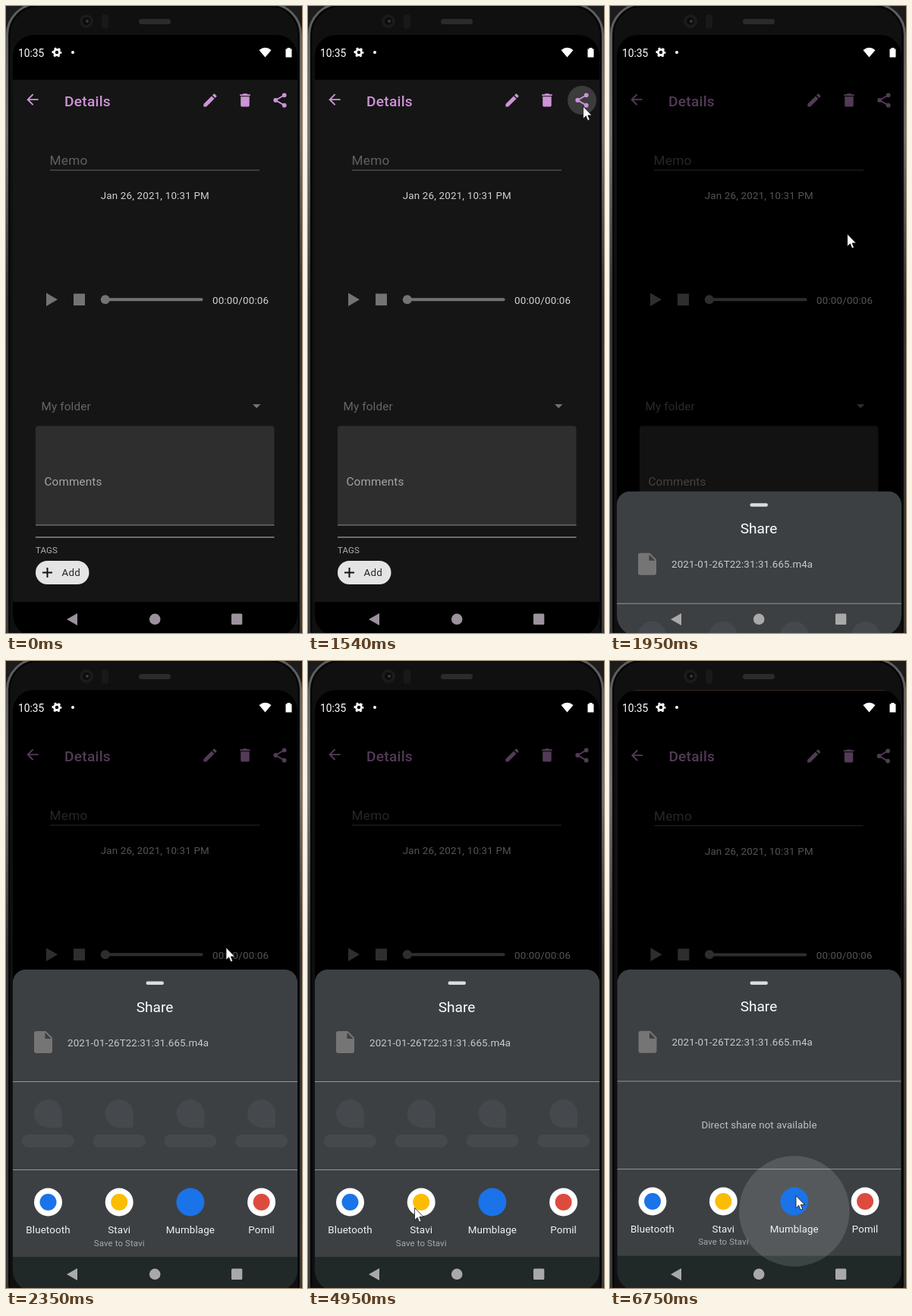
An HTML page for the animation above (6.83 s loop, 390 by 825 pixels).

```html
<!DOCTYPE html>
<html lang="en">
<head>
<meta charset="utf-8">
<title>Sharing a memo</title>
<style>
html, body { margin: 0; width: 100%; height: 100%; overflow: hidden; background: #000; }
svg { display: block; width: 390px; height: 825px; }
text { font-family: Roboto, Arial, sans-serif; font-size: 13.37px; letter-spacing: .12px; }
.body { letter-spacing: .2px; }
.mid { text-anchor: middle; }
.title { font-size: 19.1px; font-weight: 500; letter-spacing: .28px; }
.heading { font-size: 19.1px; letter-spacing: 0; }
.input { font-size: 15.28px; letter-spacing: .14px; }
.small { font-size: 11.46px; letter-spacing: .1px; }
</style>
</head>
<body>
<svg viewBox="0 0 390 825">
  <defs>
    <clipPath id="glass"><rect x="9" y="38" width="375" height="791" rx="27"/></clipPath>
    <linearGradient id="edge" x1="0" y1="0" x2="0" y2="1">
      <stop offset="0" stop-color="#5c5c5c"/>
      <stop offset=".2" stop-color="#707070"/>
      <stop offset=".45" stop-color="#343434"/>
      <stop offset="1" stop-color="#3c3c3c"/>
    </linearGradient>
  </defs>

  <!-- phone body -->
  <rect width="390" height="825" fill="#1c1c1c"/>
  <rect x="1.5" y="-3" width="387" height="860" rx="41" fill="#101010" stroke="url(#edge)" stroke-width="3"/>
  <rect x="4.5" y="0" width="381" height="860" rx="38" fill="none" stroke="#050505" stroke-width="2"/>
  <circle cx="106" cy="20" r="9" fill="#1b1b1b"/>
  <circle cx="106" cy="20" r="5" fill="#0c0c0c"/>
  <circle cx="107" cy="20" r="2" fill="#3a3a3a"/>
  <rect x="126" y="11" width="9" height="19" rx="4" fill="#191919"/>
  <rect x="175" y="17" width="42" height="7" rx="3.5" fill="#2b2b2b"/>

  <g clip-path="url(#glass)">
    <rect x="9" y="38" width="375" height="791" fill="#35201d"/>
    <g id="app">
      <rect x="9" y="38" width="375" height="795" fill="#000"/>
      <rect id="page" x="9" y="97" width="375" height="687" fill="#151515"/>
      <circle id="tap" fill="#fff" fill-opacity=".17"/>

      <!-- toolbar -->
      <g fill="#ce93d8">
        <path transform="translate(23.5 111.7) scale(.955)" d="M20 11H7.83l5.59-5.59L12 4l-8 8 8 8 1.41-1.41L7.83 13H20z"/>
        <path transform="translate(257.5 112.5) scale(.955)" d="M3 17.25V21h3.75L17.81 9.94l-3.75-3.75zM20.71 7.04a1 1 0 0 0 0-1.41l-2.34-2.34a1 1 0 0 0-1.41 0l-1.83 1.83 3.75 3.75z"/>
        <path transform="translate(303.5 112.5) scale(.955)" d="M6 19a2 2 0 0 0 2 2h8a2 2 0 0 0 2-2V7H6zM19 4h-3.5l-1-1h-5l-1 1H5v2h14z"/>
        <g transform="translate(349.5 112.5) scale(.955)">
          <path d="M18 5L6 12l12 7" fill="none" stroke="#ce93d8" stroke-width="2"/>
          <circle cx="18" cy="5" r="3"/><circle cx="6" cy="12" r="3"/><circle cx="18" cy="19" r="3"/>
        </g>
        <text class="title" x="77" y="131.5">Details</text>
      </g>

      <!-- memo form -->
      <text x="57.5" y="209" fill="#606060" style="font-size:17.2px;letter-spacing:.3px">Memo</text>
      <path d="M58 216H334" stroke="#626262"/>
      <text class="body mid" x="196.3" y="254" fill="#d2d2d2">Jan 26, 2021, 10:31 PM</text>
      <g fill="#737373">
        <path d="M53 377.5V395L68 386.2zM89 378.5h15v15.5H89z"/>
        <rect x="130" y="384.3" width="129.5" height="4" rx="2"/>
        <circle cx="130.8" cy="386.2" r="6"/>
      </g>
      <text class="body" x="272" y="391.5" fill="#d2d2d2">00:00/00:06</text>
      <text class="input" x="46.5" y="531.5" fill="#666">My folder</text>
      <path d="M325 524H335.5L330.2 529.2z" fill="#727272"/>
      <path d="M39 683V556.5a4 4 0 0 1 4-4H349.5a4 4 0 0 1 4 4V683z" fill="#2e2e2e"/>
      <path d="M39 683H353.5" stroke="#8f8f8f"/>
      <text class="input" x="50.5" y="630.5" fill="#a5a5a5">Comments</text>
      <path d="M39 699H353.5" stroke="#c4c4c4"/>
      <text class="small" x="39" y="720" fill="#b0b0b0">TAGS</text>
      <rect x="39" y="730" width="70.5" height="31" rx="15.5" fill="#e4e4e4"/>
      <path d="M48 745.5H61M54.5 739V752" stroke="#111" stroke-width="2"/>
      <text class="body" x="73.5" y="750" fill="#262626">Add</text>

      <rect id="dim" x="9" y="97" width="375" height="736" fill="#000"/>

      <!-- share sheet, placed at its open position -->
      <g id="sheet">
        <path d="M9 850V423a17 17 0 0 1 17-17H367a17 17 0 0 1 17 17V850z" fill="#3c4043"/>
        <rect x="184.5" y="421.5" width="23.5" height="4.5" rx="2.2" fill="#dadce0"/>
        <text class="mid heading" x="196" y="461.5" fill="#fff">Share</text>
        <path d="M40 487H52.5L61 495.5V513a3 3 0 0 1-3 3H40a3 3 0 0 1-3-3V490a3 3 0 0 1 3-3z" fill="#757575"/>
        <path d="M51.5 489V497H59.5z" fill="#3c4043"/>
        <text x="81" y="506.5" fill="#c6c9cc">2021-01-26T22:31:31.665.m4a</text>
        <path d="M9 553.5H384M9 669.5H384" stroke="#92969a"/>
        <g id="bones" fill="#45494d"></g>
        <text id="notice" class="mid" x="196.5" y="616" fill="#bdc1c6">Direct share not available</text>
      </g>
      <rect id="shade" x="9" y="784" width="375" height="50" fill="#040e0b"/>
      <circle id="press" fill="#fff" fill-opacity=".13"/>
      <g id="targets"></g>
    </g>

    <!-- system bars -->
    <g fill="#fff">
      <text x="16" y="66.5" style="font-size:13.8px;letter-spacing:0">10:35</text>
      <circle cx="67" cy="61" r="3.6" fill="none" stroke="#fff" stroke-width="2.8"/>
      <circle cx="67" cy="61" r="5.6" fill="none" stroke="#fff" stroke-width="1.8" stroke-dasharray="2.93" stroke-dashoffset="1.46"/>
      <circle cx="88" cy="61" r="2"/>
      <path d="M333.5 58Q341.5 51.5 349.5 58L341.5 67.5z"/>
      <path d="M368.5 56.5H370.5V55H374.5V56.5H376.5V67.5H368.5z"/>
    </g>
    <g id="nav">
      <path d="M80 807L94 799V815z"/>
      <circle cx="196.2" cy="806.8" r="7.3"/>
      <rect x="297" y="799.5" width="14.3" height="14.5" rx="1.5"/>
    </g>
  </g>

  <path id="cursor" d="M0 0V16.3L3.7 12.8 6.1 18.7 8.7 17.6 6.3 11.9H11.5z" fill="#fff" stroke="#111" stroke-width=".8"/>
</svg>

<script>
const LOOP = 6830;
const STEP = 78; // usual time between two pictures
const $ = id => document.getElementById(id);
const column = i => 55.5 + 93.7 * i;

$('bones').innerHTML = [0, 1, 2, 3].map(i => {
  const x = column(i);
  return `<path d="M${x + 18.5} 595.5V611a3 3 0 0 1-3 3H${x}a18.5 18.5 0 1 1 18.5-18.5z"/>
    <rect x="${x - 34.5}" y="623" width="69" height="17" rx="8.5"/>`;
}).join('');

const apps = [
  { label: 'Bluetooth', plate: '#fff', mark: '#1a73e8' },
  { label: 'Stavi', plate: '#fff', mark: '#fbbc04', note: 'Save to Stavi' },
  { label: 'Mumblage', plate: '#1a73e8', mark: '#1a73e8' },
  { label: 'Pomil', plate: '#fff', mark: '#dd4b3e' }
];
$('targets').innerHTML = apps.map(({ label, plate, mark, note = '' }, i) => {
  const x = column(i);
  return `<circle cx="${x}" cy="712" r="18.5" fill="${plate}"/>
    <circle cx="${x}" cy="712" r="11" fill="${mark}"/>
    <text class="mid" x="${x}" y="753" fill="#f1f3f4">${label}</text>
    <text class="mid small" x="${x}" y="769.5" fill="#a4a8ad">${note}</text>`;
}).join('');

const mix = (a, b, p) => a + (b - a) * p;

// Progress 0..1 in even held steps; the first step lands at `from`, the last at `to`
function ramp(t, from, to = from) {
  if (t < from) return 0;
  const count = Math.round((to - from) / STEP) + 1;
  const gap = (to - from) / (count - 1) || 1;
  return Math.min(1, (Math.floor((t - from) / gap + .001) + 1) / count);
}

// Pointer legs: first step, last step, end point
const legs = [
  [70, 150, 345, 434],      // up from below the stage
  [220, 220, 410, 65],      // out on the right
  [380, 460, 354, 109],     // back in, to the share button
  [540, 700, 366, 131],
  [840, 930, 362.5, 132],
  [1630, 2110, 290, 377],   // down to the sheet
  [3630, 4250, 137.5, 702], // to the second app
  [4330, 4410, 131.5, 708],
  [4640, 4950, 140.5, 719.5],
  [5890, 6130, 215, 691],   // over to the third app
  [6210, 6370, 245, 703.5]
];

function pointer(t) {
  let x = 321, y = 1090;
  for (const [from, to, endX, endY] of legs) {
    const p = ramp(t, from, to) ** 1.12;
    x = mix(x, endX, p);
    y = mix(y, endY, p);
  }
  return [x, y];
}

const set = (id, attrs) => {
  for (const name in attrs) $(id).setAttribute(name, attrs[name]);
};

function draw(t) {
  const dark = ramp(t, 1630, 1790);
  const rise = ramp(t, 1710, 2110) ** 2;
  const swap = ramp(t, 5510, 5650);
  const scale = 1 - .0035 * ramp(t, 6750);

  set('page', { opacity: 1 - dark });
  set('dim', { opacity: .6 * dark });
  set('sheet', { transform: `translate(0 ${419 * (1 - rise)})`, opacity: Math.ceil(rise) });
  set('shade', { opacity: .48 * ramp(t, 2030, 2110) });
  set('targets', { opacity: ramp(t, 2270, 2350) });
  set('notice', { opacity: swap });
  set('bones', { opacity: 1 - swap });
  set('nav', { fill: rise ? '#a9a9a9' : '#9b929d' });
  set('app', { transform: `translate(196.5 410) scale(${scale}) translate(-196.5 -410)` });

  const tap = .79 * ramp(t, 1240, 1400) + .21 * ramp(t, 1540);
  set('tap', { cx: mix(363, 361, tap), cy: mix(132, 124, tap ** 3), r: 19 * tap, opacity: 1 - dark });

  const press = ramp(t, 6520, 6750);
  set('press', { cx: mix(245, 243, press), cy: mix(703, 725, press), r: 73 * press });

  set('cursor', { transform: `translate(${pointer(t)})` });
}

const start = performance.now();
function tick() {
  draw((performance.now() - start) % LOOP);
  requestAnimationFrame(tick);
}
tick();
</script>
</body>
</html>
```
